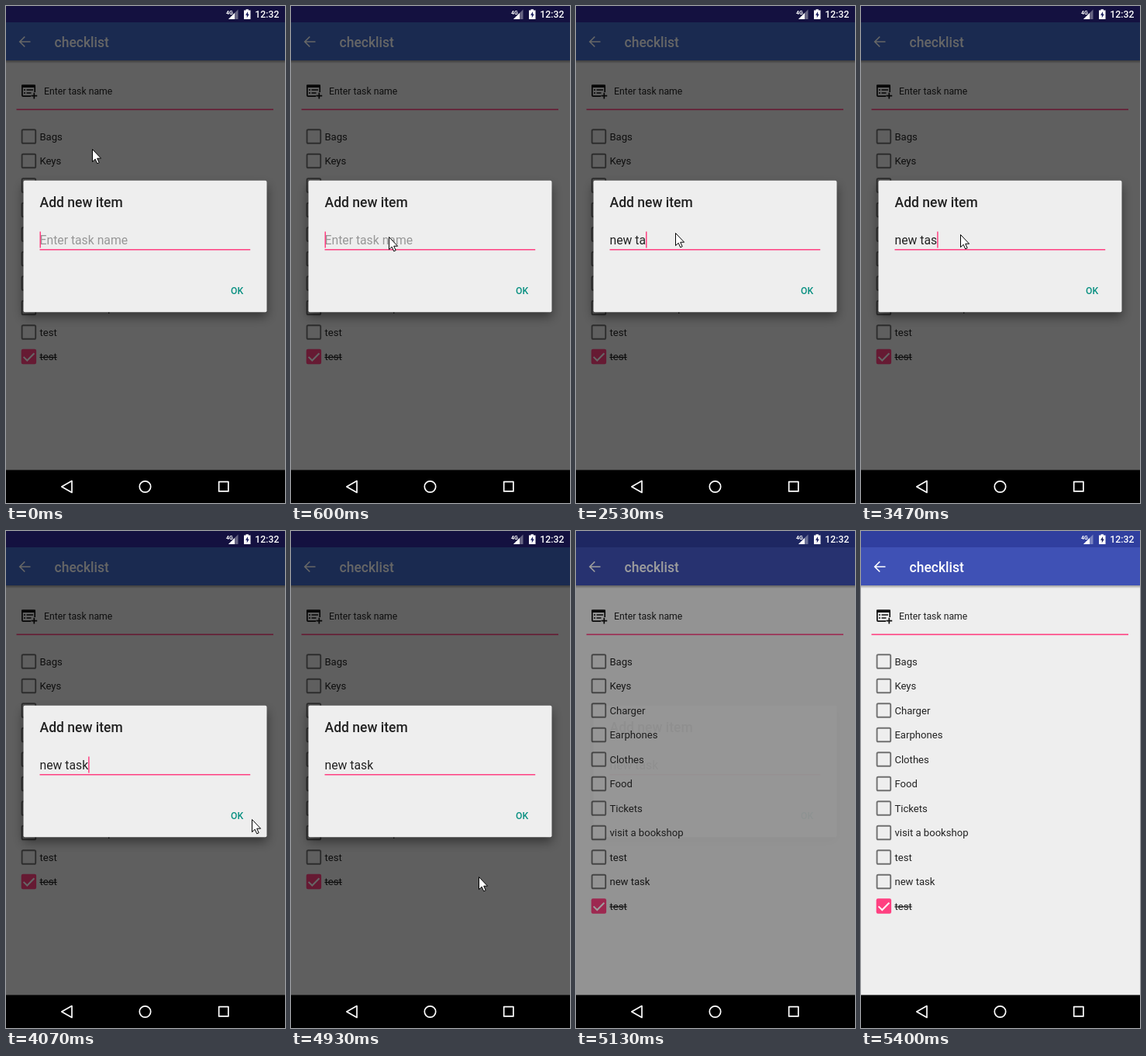
An HTML page for the animation above (5.94 s loop, 360 by 640 pixels).

```html
<!DOCTYPE html>
<html lang="en">
<head>
<meta charset="utf-8">
<title>Checklist</title>
<style>
  html, body { margin: 0; width: 100%; height: 100%; overflow: hidden; background: #000; }
  svg { display: block; width: 360px; height: 640px; }
  text { font-family: Roboto, sans-serif; white-space: pre; }
  .list { font-size: 13.125px; fill: #222; }
  .small { font-size: 12.25px; }
  .input { font-size: 15.75px; }
  .title { font-size: 17.5px; font-weight: 500; }
  .line { fill: none; stroke-width: 1.7; }
  .accent { fill: #ff4081; }
  #status { fill: #303f9f; }
  #bar { fill: #3f51b5; }
  .covered #status { fill: #322aa0; }
  .covered #bar { fill: #4069c8; }
</style>
</head>
<body>
<svg id="stage" viewBox="0 0 360 640">
  <defs>
    <linearGradient id="fall" x2="0" y2="1">
      <stop stop-color="#000" stop-opacity=".35"/>
      <stop offset="1" stop-color="#000" stop-opacity="0"/>
    </linearGradient>
    <filter id="soft" x="-20%" y="-20%" width="140%" height="150%">
      <feGaussianBlur stdDeviation="7"/>
    </filter>
  </defs>

  <rect width="360" height="600" fill="#eee"/>
  <rect id="status" width="360" height="21.5"/>
  <rect id="bar" y="21" width="360" height="49"/>
  <rect y="70" width="360" height="4" fill="url(#fall)"/>
  <path class="line" stroke="#fff" d="M31.5 46H18M24.3 39.5L17.8 46L24.3 52.5"/>
  <text class="title" x="62.5" y="53" fill="#fff">checklist</text>

  <path class="line" stroke="#111" d="M32 116.2H22Q20.9 116.2 20.9 115V103.5Q20.9 102.3 22 102.3H36Q37.2 102.3 37.2 103.5V111"/>
  <path fill="#111" d="M20 101.5H38V105H20Z"/>
  <path class="line" stroke="#111" d="M23 108H25M26.5 108H35M23 112H25M26.5 112H32.5M36.3 111.8V119.5M32.4 115.7H40.2"/>
  <text class="small" x="49" y="113.5" fill="#222">Enter task name</text>
  <rect class="accent" x="13.5" y="132.5" width="331.5" height="1.6"/>

  <g id="rows"></g>
  <g id="done">
    <rect class="accent" x="19.7" y="-9.7" width="19.4" height="19.4" rx="2.2"/>
    <path d="M22.6 .4L27.3 5L36.4 -4.2" fill="none" stroke="#fff" stroke-width="2"/>
    <text class="list" x="43.4" y="4.9" text-decoration="line-through">test</text>
  </g>

  <rect id="dim" width="360" height="598"/>

  <g fill="#fff">
    <text x="284" y="10.5" font-size="7" font-weight="700">4G</text>
    <path d="M287 17H299.5V4.5Z" opacity=".35"/>
    <path d="M287 17H295V9Z"/>
    <path d="M309.5 4.2H312.9V5.5H315.5V17H307V5.5H309.5Z"/>
    <path d="M312.1 7L309 11.7H310.8V15.3L313.8 10.6H312.1Z" fill="#1c2060"/>
    <text class="small" x="321.3" y="15.3" font-weight="500">12:32</text>
  </g>

  <g id="dialog">
    <rect x="22.5" y="232" width="314" height="168" filter="url(#soft)" opacity=".45"/>
    <rect x="22.5" y="224.7" width="314" height="169.5" rx="2" fill="#eee"/>
    <text class="title" x="43.5" y="259" fill="#222">Add new item</text>
    <text id="hint" class="input" x="43.5" y="307" fill="#979797">Enter task name</text>
    <text id="typed" class="input" x="43.5" y="307" fill="#222"></text>
    <rect id="caret" class="accent" y="290.5" width="1.5" height="21"/>
    <rect class="accent" x="43.5" y="313" width="271.7" height="1.5"/>
    <text class="small" x="290" y="371" font-weight="500" fill="#0a9182">OK</text>
  </g>

  <path id="pointer" fill="#fff" stroke="#000" d="M.5 .5V16.6L4.2 13.2L6.7 18.8L9.2 17.7L6.7 12.2H11.6Z"/>

  <rect y="597.5" width="360" height="43"/>
  <g class="line" stroke="#fff" stroke-linejoin="round">
    <path d="M71.8 619L85 611.6V626.4Z"/>
    <circle cx="179.5" cy="619" r="7.2"/>
    <rect x="274.7" y="612.7" width="12.2" height="12.2"/>
  </g>
</svg>

<script>
const LOOP = 5940;
const FRAME = 1000 / 15;
const $ = id => document.getElementById(id);
const clamp = (v, low, high) => Math.min(high, Math.max(low, v));
const rowY = index => 168 + index * 31.5;

const items = ['Bags', 'Keys', 'Charger', 'Earphones', 'Clothes', 'Food', 'Tickets',
  'visit a bookshop', 'test', 'new task'];
$('rows').innerHTML = items.map((name, i) => `
  <g transform="translate(0 ${rowY(i)})">
    <rect x="20.6" y="-8.8" width="17.6" height="17.6" rx="1.6" fill="none" stroke="#707070" stroke-width="1.9"/>
    <text class="list" x="43.4" y="4.9">${name}</text>
  </g>`).join('');
const newRow = $('rows').lastElementChild;

// Pointer gestures: a straight glide, or a curve when a bend point is given.
const home = [111, 184];
const gestures = [
  { from: 0, to: 600, end: [126, 297], bend: [118, 385] },
  { from: 600, to: 800, end: [128, 292] },
  { from: 3450, to: 4000, end: [318, 371], bend: [200, 700] },
  { from: 4000, to: 4400, end: [304, 368] },
  { from: 4670, to: 4730, end: [296, 377] },
  { from: 4867, to: 5067, end: [84, 640] }
];

function ease(t, from, to) {
  const u = clamp((t - from) / (to - from), 0, 1);
  return u * u * (3 - 2 * u);
}

function pointerAt(t) {
  return gestures.reduce((start, { from, to, end, bend }) => {
    const u = ease(t, from, to);
    return start.map((a, i) => {
      const middle = bend ? bend[i] : (a + end[i]) / 2;
      return (1 - u) ** 2 * a + 2 * u * (1 - u) * middle + u * u * end[i];
    });
  }, home);
}

// Letters typed so far in a steady burst of key presses
const burst = (t, start, letters) => clamp(Math.floor((t - start) / 133) + 1, 0, letters);

function draw(t) {
  const count = burst(t, 1730, 4) + burst(t, 2395, 3) + burst(t, 3595, 1);
  const caretOn = count ? t < 4100 : Math.floor((t - 60) / 500) % 2 !== 0;
  const added = t >= 5130;

  $('stage').classList.toggle('covered', t < 5060);
  $('dim').setAttribute('opacity', .6 * (1 - ease(t, 4950, 5400)));
  $('dialog').style.opacity = 1 - ease(t, 4950, 5155);

  newRow.style.display = added ? '' : 'none';
  $('done').setAttribute('transform', `translate(0 ${rowY(added ? 10 : 9)})`);

  $('hint').style.display = count ? 'none' : '';
  $('typed').textContent = 'new task'.slice(0, count);
  $('caret').setAttribute('x', 43.5 + (count ? $('typed').getComputedTextLength() : 0));
  $('caret').setAttribute('opacity', caretOn ? 1 : 0);
  $('pointer').setAttribute('transform', `translate(${pointerAt(t).map(Math.round)})`);
}

// The picture advances in steps of 1/15 s, like a screen recording.
const start = performance.now();
function tick() {
  const t = (performance.now() - start) % LOOP;
  draw(Math.floor((t + 5) / FRAME) * FRAME);
  requestAnimationFrame(tick);
}
tick();
</script>
</body>
</html>
```
